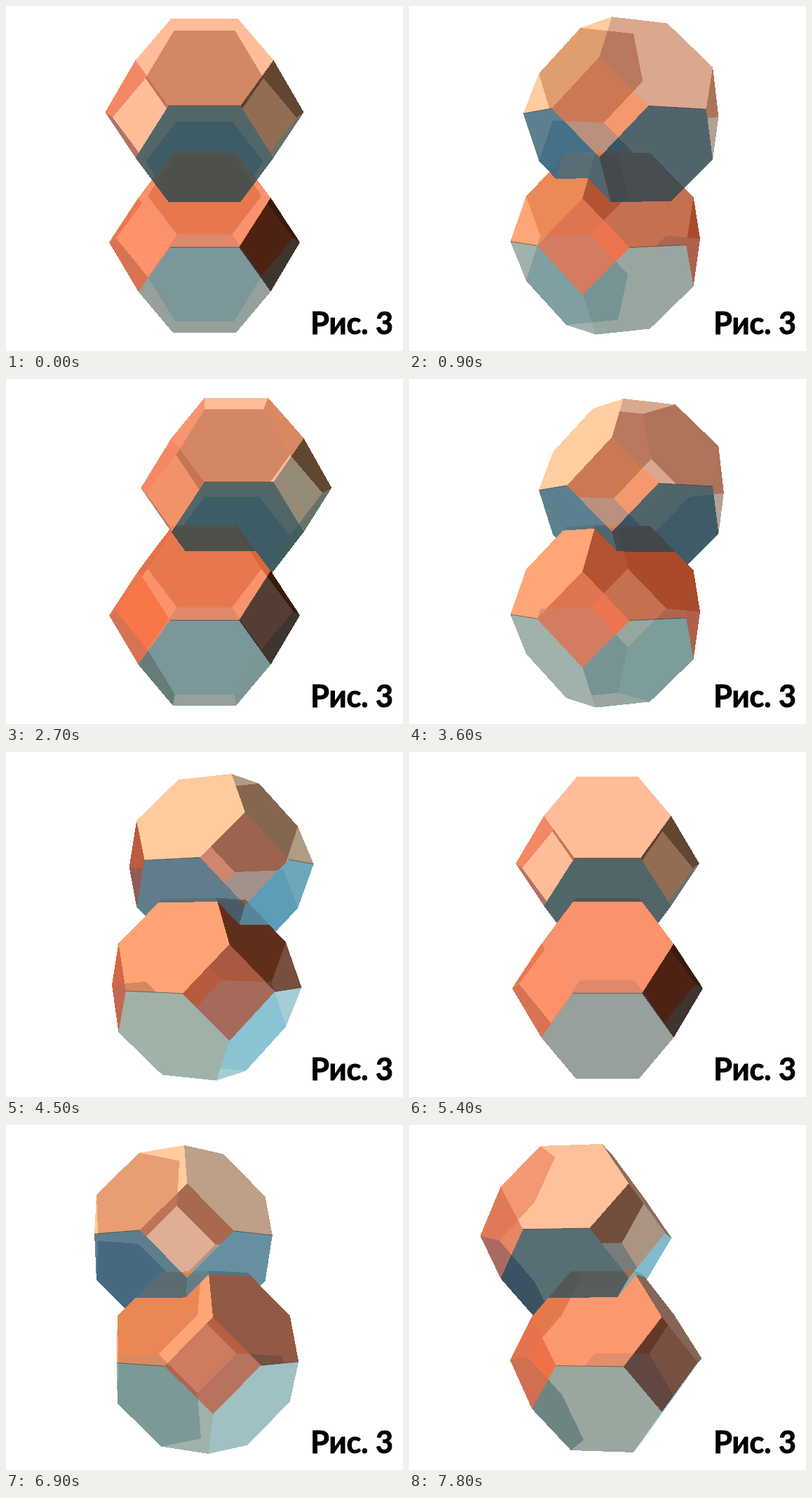
Write an HTML page with a canvas that moves like this. It is 566 px wide and 491 px high and loops after 8 s.

```html
<!DOCTYPE html>
<html lang="ru">
<head>
<meta charset="utf-8">
<title>Рис. 3</title>
<style>
  html, body { margin: 0; width: 566px; height: 491px; overflow: hidden; background: #fff; }
  canvas, svg { position: absolute; left: 0; top: 0; display: block; }
  text { font: 700 43px Lato, "Open Sans", sans-serif; text-anchor: middle; stroke: #000; stroke-width: 1px; }
</style>
</head>
<body>
<canvas id="stage" width="566" height="491"></canvas>
<svg width="566" height="491"><text x="493" y="467">Рис. 3</text></svg>
<script>
const W = 566, H = 491;
const FOCAL = 1160, DIST = 18.8, EYE = 1.295, CX = 283, CY = 253.3;
const STEP = 300, LOOP = 8000;
const R = Math.SQRT1_2, DEG = Math.PI / 180;

const ctx = document.getElementById('stage').getContext('2d');
const img = ctx.createImageData(W, H);
const px = img.data;
const near = new Float64Array(W * H);

// Face tint over white by the azimuth of its normal (0 = viewer, 90 = right).
const HEX_KEYS = [-90, -60, -30, 0, 30, 60, 90, 180, 270];
const SQ_KEYS = [-90, -45, -15, 15, 45, 75, 90, 180, 270];

function tint(keys, see, hexes) {
  const cols = hexes.split(' ').map(h => [0, 2, 4].map(i => parseInt(h.substr(i, 2), 16)));
  cols.push(cols[0]);
  return { keys, see, cols };
}

const lower = {
  up: tint(HEX_KEYS, 0.3, 'b4968c ffa576 ffa374 fa926b c67052 784e3e 8c7064 c0aa9f'),
  down: tint(HEX_KEYS, 0.3, '648296 a0b2aa a0b2a8 95a19a 97a79f a5cdd5 aadcf0 a8deff'),
  side: tint(SQ_KEYS, 0.25, 'd7785f ff926b f08c6a bc735c 543e33 c3694e dc7d64 f0a598'),
  shift: 0, rise: 0
};
const upper = {
  up: tint(HEX_KEYS, 0.3, 'e67d7d ffcda0 ffca9e ffbc98 d9a88f b09b84 7d554b 6e4e50'),
  down: tint(HEX_KEYS, 0.16, '444482 5c8090 617d8c 526668 51646c 70a6bb 8cc6d7 82c3eb'),
  side: tint(SQ_KEYS, 0.4, 'be826e ffbc98 f5b994 d4aa96 968a78 e1b9a0 f0c3a5 ffa8a0'),
  shift: R, rise: 4 * R
};

function colorAt({ keys, cols }, az) {
  const a = ((az + 90) % 360 + 360) % 360 - 90;
  let i = 0;
  while (a >= keys[i + 1]) i++;
  const f = (a - keys[i]) / (keys[i + 1] - keys[i]);
  return cols[i].map((c, n) => c + (cols[i + 1][n] - c) * f);
}

// Faces as [right, forward, height] around their own azimuth.
const hexagon = s => [[-R, 3 * R, 0], [R, 3 * R, 0], [2 * R, 2 * R, s], [R, R, 2 * s], [-R, R, 2 * s], [-2 * R, 2 * R, s]];
const square = [[0, 2, 1], [1, 2, 0], [0, 2, -1], [-1, 2, 0]];
const group = (kind, pts, normal, turns) => turns.map(turn => ({ kind, pts, normal, turn }));

// Fixed paint order: a face hides whatever is painted behind it later.
const FACES = [
  ...group('down', hexagon(-1), [0, 2 * R, -1], [180, 0, 90, -90]),
  ...group('up', hexagon(1), [0, 2 * R, 1], [180, 0, 90, -90]),
  ...group('side', square, [0, 1, 0], [135, -45, 45, -135])
];

function spin([r, d, h], az) {
  const c = Math.cos(az * DEG), s = Math.sin(az * DEG);
  return [r * c + d * s, -h, r * s - d * c];
}

function fill(poly, slope, col, see) {
  const ys = poly.map(p => p[1]);
  const y0 = Math.max(0, Math.ceil(Math.min(...ys) - 0.5));
  const y1 = Math.min(H - 1, Math.floor(Math.max(...ys) - 0.5));
  for (let y = y0; y <= y1; y++) {
    const yc = y + 0.5;
    let a = W, b = 0;
    poly.forEach((p, i) => {
      const q = poly[(i + 1) % poly.length];
      if ((p[1] <= yc) === (q[1] <= yc)) return;
      const x = p[0] + (q[0] - p[0]) * (yc - p[1]) / (q[1] - p[1]);
      a = Math.min(a, x);
      b = Math.max(b, x);
    });
    for (let x = Math.ceil(a - 0.5); x < b - 0.5; x++) {
      const k = y * W + x;
      const inv = slope[0] * (x + 0.5 - CX) / FOCAL + slope[1] * (yc - CY) / FOCAL + slope[2];
      if (inv <= near[k]) continue;
      near[k] = inv;
      for (let n = 0; n < 3; n++) {
        px[4 * k + n] = col[n] - see * (255 - px[4 * k + n]);
      }
    }
  }
}

function drawBody(body, angle, seams) {
  const [ox, , oz] = spin([0, body.shift, 0], angle);
  for (const { kind, pts, normal, turn } of FACES) {
    const az = angle + turn;
    const space = pts.map(p => {
      const [x, y, z] = spin(p, az);
      return [x + ox, y + EYE - body.rise, z + oz + DIST];
    });
    const n = spin(normal, az);
    const gap = n[0] * space[0][0] + n[1] * space[0][1] + n[2] * space[0][2];
    const flat = space.map(([x, y, z]) => [CX + FOCAL * x / z, CY + FOCAL * y / z]);
    fill(flat, n.map(v => v / gap), colorAt(body[kind], az), body[kind].see);
    if (kind === 'down' && gap < 0) seams.push(flat.slice(0, 2));
  }
}

function draw(angle) {
  const seams = [];
  px.fill(255);
  near.fill(0);
  drawBody(lower, angle, seams);
  drawBody(upper, angle, seams);
  ctx.putImageData(img, 0, 0);
  ctx.strokeStyle = 'rgba(40, 45, 45, .55)';
  ctx.beginPath();
  for (const [p, q] of seams) {
    ctx.moveTo(...p);
    ctx.lineTo(...q);
  }
  ctx.stroke();
}

let shown = -1;
function tick() {
  const step = Math.floor(performance.now() % LOOP / STEP);
  if (step !== shown) {
    shown = step;
    draw(step * 10);
  }
  requestAnimationFrame(tick);
}
tick();
</script>
</body>
</html>
```
